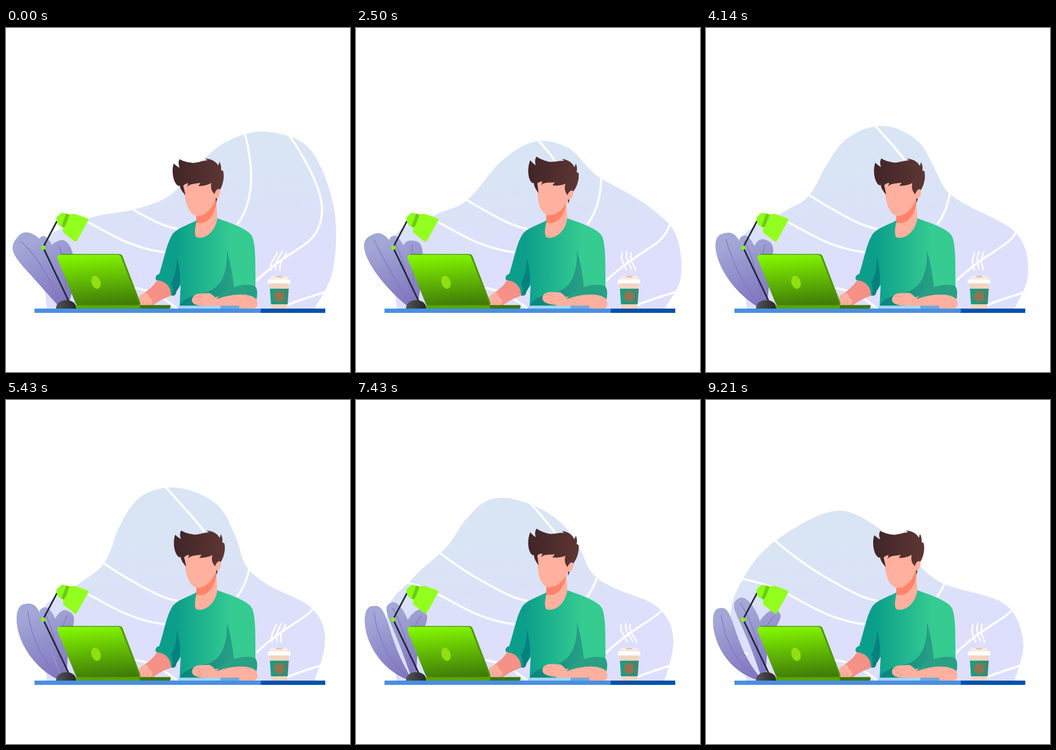
An HTML page that plays this animation: 640x640 px, repeating every 9.29 s.

```html
<!DOCTYPE html>
<html lang="en">
<head>
<meta charset="utf-8">
<title>Working at the desk</title>
<style>
  html, body { margin: 0; width: 100%; height: 100%; overflow: hidden; background: #fff; }
  svg { display: block; width: 100%; height: 100%; }
</style>
</head>
<body>
<svg viewBox="0 0 640 640">
  <defs>
    <linearGradient id="sky" gradientUnits="userSpaceOnUse" x1="320" y1="250" x2="340" y2="440">
      <stop stop-color="#d9e5f4"/><stop offset="1" stop-color="#dddffc"/>
    </linearGradient>
    <linearGradient id="leaf" gradientUnits="userSpaceOnUse" x1="50" y1="400" x2="95" y2="515">
      <stop stop-color="#a2a7d6"/><stop offset="1" stop-color="#8075bf"/>
    </linearGradient>
    <linearGradient id="screen" gradientUnits="userSpaceOnUse" x1="165" y1="422" x2="172" y2="516">
      <stop stop-color="#82f500"/><stop offset="1" stop-color="#407c08"/>
    </linearGradient>
    <linearGradient id="shirt" gradientUnits="userSpaceOnUse" x1="315" y1="0" x2="420" y2="0">
      <stop stop-color="#0b9f8b"/><stop offset="1" stop-color="#35cb91"/>
    </linearGradient>
    <linearGradient id="fold" gradientUnits="userSpaceOnUse" x1="325" y1="0" x2="425" y2="0">
      <stop stop-color="#07837f"/><stop offset="1" stop-color="#28a185"/>
    </linearGradient>
    <linearGradient id="hair">
      <stop stop-color="#402528"/><stop offset="1" stop-color="#5d3633"/>
    </linearGradient>
    <linearGradient id="sleeve">
      <stop stop-color="#14a085"/><stop offset="1" stop-color="#3f8872"/>
    </linearGradient>
    <linearGradient id="dome">
      <stop stop-color="#555"/><stop offset="1" stop-color="#26262c"/>
    </linearGradient>
    <clipPath id="blobClip"><path id="blobEdge"/></clipPath>
  </defs>

  <g clip-path="url(#blobClip)">
    <rect width="640" height="522" fill="url(#sky)"/>
    <g fill="none" stroke="#fff" stroke-width="4">
      <path d="M443 192C456 235 459 285 453 310C449 335 441 350 430 366"/>
      <path d="M525 197C560 247 588 302 588 337C588 365 578 386 558 401C535 418 500 436 465 471"/>
      <path d="M115 250C160 290 200 318 237 338C270 357 295 370 320 374"/>
      <path d="M60 331C95 338 125 347 152 361C190 380 230 410 300 418"/>
      <path d="M522 516C545 506 566 500 605 488"/>
      <path d="M280 142C320 190 355 223 373 251"/>
      <path d="M225 483C260 483 285 495 320 523"/>
      <path d="M40 456L78 473"/>
    </g>
  </g>

  <g id="plant" fill="url(#leaf)" stroke="#8272c3" stroke-width="1.3"></g>

  <!-- lamp -->
  <path d="M95 359L69 408L118 511" fill="none" stroke="#212b3a" stroke-width="3"/>
  <circle cx="69" cy="408.500" r="4.200" fill="#84f015"/>
  <path d="M93 522C93 501 131 501 131 522Z" fill="url(#dome)"/>
  <path d="M94 352L102 345Q104 343 107 344L121 348L108 372L98 367Q93 360 94 352Z" fill="#8bfb1a"/>
  <path d="M112 345L121 348L109 372L103 369Z" fill="#6dcd10"/>
  <path d="M118 348Q122 345 129 346L151 354Q155 356 152 360L132 396Q129 399 126 396L107 381C104 377 107 370 111 367Z" fill="#93ff1f"/>

  <!-- person -->
  <path d="M282 467C276 480 262 489 251 498L250 516H273C286 506 300 501 310 497L304 474Z" fill="#f59186"/>
  <path d="M262 492C253 494 246 498 247 505C246 510 247 514 250 516H267C275 512 274 505 267 502Z" fill="#ffb09e"/>
  <path d="M257 515L255 508M264 514L262 506" stroke="#ef8b7b" fill="none"/>
  <path d="M354 358C340 366 321 371 311 382C299 398 293 435 285 458C279 458 276 467 280 469C298 471 307 482 307 497Q315 501 317 490L325 478L323 517H450L466 505C468 494 468 486 464 481C464 440 465 405 458 388C452 374 416 362 393 354Z" fill="url(#shirt)"/>
  <path d="M318 426C318 446 315 460 307 474Q312 484 309 498Q316 499 317 490C326 478 326 460 318 426Z" fill="#06817f"/>
  <path d="M411 414C412 450 404 481 375 491C348 497 331 502 323 517H400L428 490L424 482C422 458 416 430 411 414Z" fill="url(#fold)"/>
  <path d="M354 345L354 362C351 375 350 388 356 390C374 393 391 375 393 354L391 318Z" fill="#ffb09e"/>
  <path d="M354 345V362C374 368 391 348 392 316Z" fill="#ff8469"/>
  <path d="M378 505C400 496 443 487 464 503C470 511 469 520 461 522H434V517H372Z" fill="#ffb09e"/>
  <path d="M391 505C408 482 444 473 463 480C468 485 468 496 466 504C455 494 425 492 391 505Z" fill="#27a084"/>
  <g id="fist">
    <path d="M346 508C345 499 353 494 362 494L378 493C385 496 389 502 396 507L382 517H365C357 516 348 515 346 508Z" fill="#ffb09e"/>
    <path d="M350 501C357 500 362 499 366 503M353 508L362 505M359 514L367 509" stroke="#ef9482" fill="none"/>
  </g>
  <g id="head">
    <path d="M331 286V300C333 327 341 350 358 350C374 348 385 332 390 318C397 317 400 306 398 301L384 280Z" fill="#ffb09e"/>
    <path d="M390 317H393L391 325Z" fill="#4d2c2b"/>
    <path d="M312 252C307 268 312 290 321 294L323 293C325 301 329 306 334 311L330 294C331 291 336 289 339 289L337 296C341 290 350 290 362 288L358 294C367 294 376 292 382 288C380 298 383 304 388 309C390 301 395 297 398 301C403 293 407 279 404 266L400 264C401 258 399 252 397 249L395 256C390 247 380 243 370 243L375 246C364 247 356 251 348 251C338 250 330 248 323 244C320 249 321 255 323 260C319 258 315 255 312 252Z" fill="url(#hair)"/>
  </g>

  <!-- desk, papers, laptop -->
  <path d="M319 522L322 516.500H399V522Z" fill="#a6d6f1"/>
  <path d="M399 516.500H434V522H399Z" fill="#70a9dc"/>
  <path d="M101 420.500H211Q215 420.500 217 425L250 511Q251 516 246 517H132Z" fill="#4b960a"/>
  <path d="M101 422H209Q212 422 214 426L247 512Q248 516 244 516H136Q131 516 129 511L96 430Q94 422 101 422Z" fill="url(#screen)"/>
  <ellipse cx="167.500" cy="473" rx="8.500" ry="12.500" transform="rotate(-18 167.500 473)" fill="#8fdf12"/>
  <path d="M129 515.500H249V522H133Q129 522 129 515.500Z" fill="#57a605"/>
  <path d="M249 515.500H306V519Q306 522 303 522H249Z" fill="#3c770b"/>
  <path d="M53 522H474V530H53Z" fill="#488fe2"/>
  <path d="M474 522H594V530H474Z" fill="#0052aa"/>

  <!-- coffee -->
  <path id="steam" fill="none" stroke="#fff" stroke-width="2.800" stroke-linecap="round"/>
  <path d="M490 474H526L523 522H494Z" fill="#f3d4bf"/>
  <path d="M491 485H526L524 514H493Z" fill="url(#sleeve)"/>
  <circle cx="508" cy="499.500" r="10" fill="#8f7450"/>
  <path d="M492 461.500H524L526 468H490Z" fill="#f8ebe2"/>
  <path d="M503 461.500H514V464H503Z" fill="#e2bda4"/>
  <rect x="487" y="468" width="42" height="7.500" rx="1" fill="#fff"/>
  <path d="M490 475.500H526" stroke="#eddfd8"/>
</svg>
<script>
const LOOP = 9290, LAST = 9210;
const el = id => document.getElementById(id);
const mix = (a, b, u) => a + (b - a) * u;
const mixAll = (a, b, u) => a.map((v, i) => mix(v, b[i], u));
const smooth = u => (1 - Math.cos(Math.PI * Math.min(1, Math.max(0, u)))) / 2;
const polygon = points => 'M' + points.map(p => p[0].toFixed(2) + ' ' + p[1].toFixed(2)).join('L') + 'Z';

// Linear motion through poses reached at the given times.
function pose(times, poses, t) {
  let i = 1;
  while (i < times.length - 1 && times[i] < t) i++;
  return mixAll(poses[i - 1], poses[i], Math.min(1, (t - times[i - 1]) / (times[i] - times[i - 1])));
}

// Catmull-Rom curve through the points.
function spline(points, steps) {
  const out = [], last = points.length - 1;
  for (let i = 0; i < last; i++) {
    const [p, q, r, s] = [i - 1, i, i + 1, i + 2].map(k => points[Math.min(last, Math.max(0, k))]);
    for (let n = 0; n < steps; n++) {
      const u = n / steps;
      out.push([0, 1].map(k => q[k] + u / 2 * (r[k] - p[k]
        + u * (2 * p[k] - 5 * q[k] + 4 * r[k] - s[k] + u * (3 * (q[k] - r[k]) + s[k] - p[k])))));
    }
  }
  return [...out, points[last]];
}

// The backdrop is a radius per degree, seen from a centre on the desk line.
const CX = 330, CY = 522;
function radii(outline) {
  const points = ('574,522 ' + outline + ' 76,522').split(' ').map(p => p.split(',').map(Number));
  const out = [];
  for (const [x, y] of spline(points, 250)) {
    const degrees = Math.atan2(CY - y, x - CX) * 180 / Math.PI;
    while (out.length <= degrees + 1e-6) out.push(Math.hypot(x - CX, y - CY));
  }
  return out;
}
const blobTimes = [0, 3000, 6000, LAST];
const blobPoses = [
  '608,450 610,335 565,225 485,193 415,209 362,249 305,311 237,338 155,354 72,400',
  '604,465 592,388 543,346 447,297 395,224 333,197 268,232 203,317 150,345 67,392',
  '591,440 563,388 487,350 446,311 427,249 391,187 313,154 247,167 206,225 179,300 123,349 68,395',
  '590,450 555,379 440,341 385,296 335,248 243,206 128,263 68,334 46,410'
].map(radii);

function drawBlob(t) {
  el('blobEdge').setAttribute('d', polygon(pose(blobTimes, blobPoses, t).map((r, degrees) => {
    const a = degrees * Math.PI / 180;
    return [CX + r * Math.cos(a), CY - r * Math.sin(a)];
  })));
}

// A leaf is a quadratic spine with a blunt-tipped width; poses hold bend x y, tip x y, half width.
const leafTimes = [0, 5430, LAST];
const leaves = [
  { base: [112, 522], poses: [[114, 440, 95, 397, 21], [88, 440, 118, 394, 19], [85, 432, 136, 395, 16]] },
  { base: [106, 522], poses: [[98, 450, 66, 388, 12], [95, 440, 68, 387, 14], [97, 420, 58, 371, 18]] },
  { base: [104, 522], poses: [[70, 430, 20, 391, 29], [45, 462, 39, 379, 25], [35, 480, 27, 387, 20]] }
];
for (const leaf of leaves) {
  leaf.shape = document.createElementNS('http://www.w3.org/2000/svg', 'path');
  leaf.vein = leaf.shape.cloneNode();
  leaf.shape.setAttribute('stroke', 'none');
  leaf.vein.setAttribute('fill', 'none');
  el('plant').append(leaf.shape, leaf.vein);
}

function drawLeaf({ base, poses, shape, vein }, t) {
  const [bx, by, tx, ty, width] = pose(leafTimes, poses, t);
  const bend = [bx, by], tip = [tx, ty], near = [], far = [], spine = [];
  for (let i = 0; i <= 40; i++) {
    const u = 1 - (1 - i / 40) ** 2;
    const from = mixAll(base, bend, u), to = mixAll(bend, tip, u);
    const [x, y] = mixAll(from, to, u);
    const dx = to[0] - from[0], dy = to[1] - from[1];
    const w = 2 * width * u ** .8 * (1 - u) ** .35 / Math.hypot(dx, dy);
    near.push([x + dy * w, y - dx * w]);
    far.unshift([x - dy * w, y + dx * w]);
    if (u < .93) spine.push([x, y]);
  }
  shape.setAttribute('d', polygon([...near, ...far]));
  vein.setAttribute('d', polygon(spine).slice(0, -1));
}

// Steam leans right, swings left, then drifts back.
function drawSteam(t) {
  const s = t % 6000;
  const lean = s < 1430 ? mix(1, -1, s / 1430) : mix(-1, 1, ((s - 1430) / 4570) ** 1.3);
  el('steam').setAttribute('d', [499, 508, 516].map((x, i) => {
    const y = i === 1 ? 416 : 418;
    return `M${x + 6 * lean} ${y}C${x - 5 + 3 * lean} ${y + 15} ${x - 4 - 4 * lean} ${y + 18} ${x - 6 * lean} ${y + 32}`;
  }).join(''));
}

function drawPerson(t) {
  const beat = t % 4800;
  const angle = 6.3 * smooth(beat / 2000) * (1 - smooth((beat - 2800) / 2000));
  el('head').setAttribute('transform', `rotate(${angle} 372 360)`);
  el('fist').setAttribute('transform', `rotate(${angle * .8} 394 515)`);
}

function frame(now) {
  const t = Math.min(now % LOOP, LAST);
  drawBlob(t);
  leaves.forEach(leaf => drawLeaf(leaf, t));
  drawSteam(t);
  drawPerson(t);
  requestAnimationFrame(() => frame(performance.now() - start));
}
const start = performance.now();
frame(0);
</script>
</body>
</html>
```
